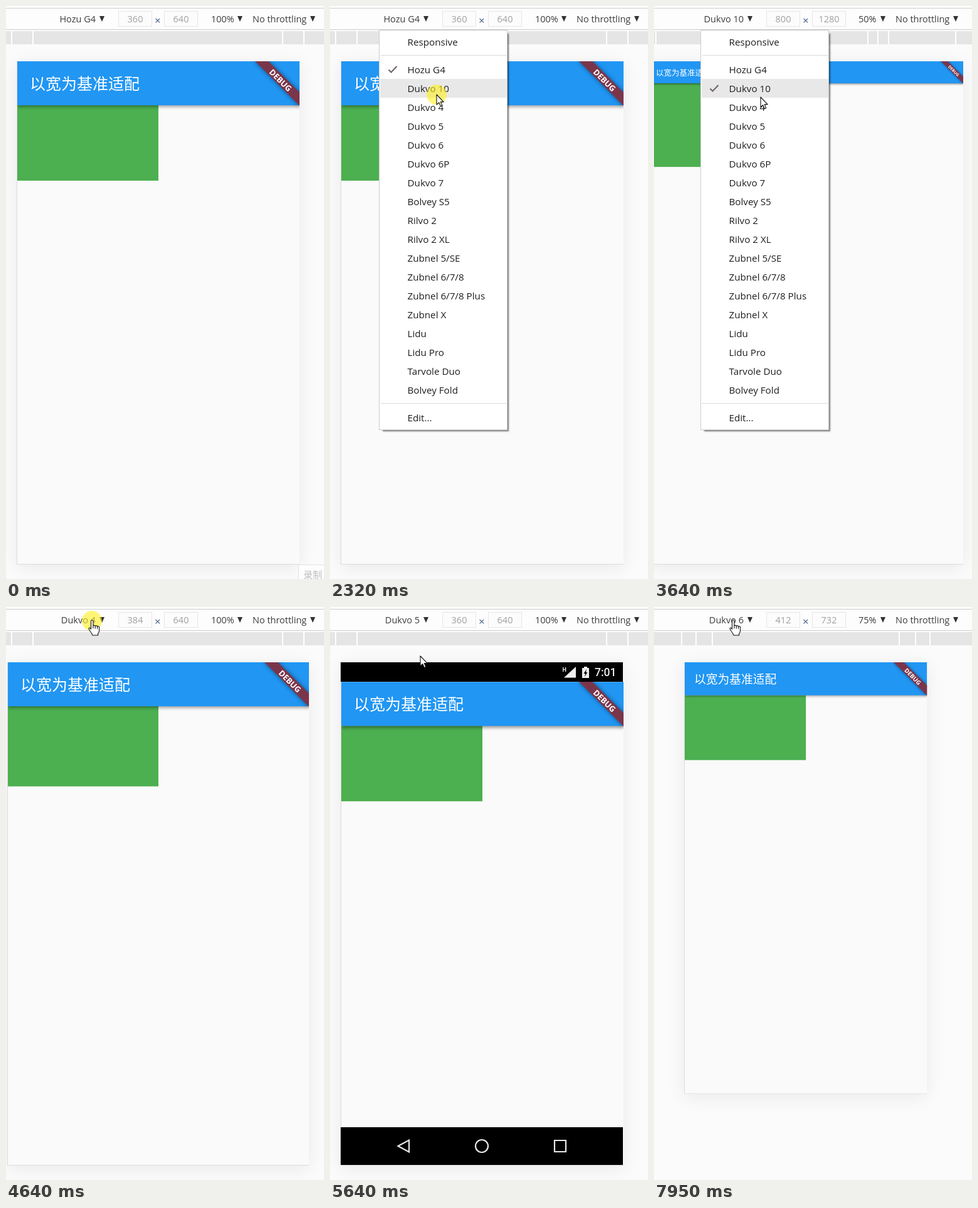
Animation, 507 px wide and 912 px high, one loop 8 s. Source, as an HTML page:

```html
<!DOCTYPE html>
<html lang="zh">
<head>
<meta charset="utf-8">
<title>Width-based layout</title>
<style>
html, body { margin: 0; width: 100%; height: 100%; overflow: hidden; background: #fbfbfb; }
#stage { position: absolute; left: 0; top: 0; width: 507px; height: 912px; overflow: hidden; background: #fbfbfb;
  font: 14.5px/20px "Open Sans", "Noto Sans", sans-serif; color: #3c3c3c; }
#stage div, #stage span, #stage svg { position: absolute; white-space: pre; box-sizing: border-box; }
#bar { left: 0; top: 0; width: 507px; height: 61px; background: #fdfdfd; }
#bar .line { left: 0; width: 507px; height: 1px; background: #ccc; }
#bar .ruler { left: 0; top: 40px; width: 507px; height: 21px; background: #e5e5e5; }
#bar .ruler div { top: 0; width: 2px; height: 21px; background: #fff; }
#bar .tri { top: 16px; border: solid transparent; border-width: 9px 4.7px 0; border-top-color: #333; }
#bar .num { top: 8px; width: 54px; height: 25px; border: 1px solid #e6e6e6; background: #fcfcfc;
  color: #a0a0a0; text-align: center; line-height: 24px; }
.frame { border: solid #ddd; border-width: 0 0 1px 1px; box-shadow: 0 5px 28px rgba(0,0,0,.075); }
.page { overflow: hidden; transform-origin: 0 0; background: #fafafa; }
.green { left: 0; background: #4caf50; }
.app { left: 0; width: 100%; height: 56px; background: #2196f3;
  box-shadow: 0 2px 4px -1px rgba(0,0,0,.25), 0 3px 4px rgba(0,0,0,.16), 0 1px 6px rgba(0,0,0,.12); }
.app span { left: 16px; top: 13px; font: 20px/30px "Noto Sans CJK SC", "Noto Sans CJK", sans-serif; color: #fff; }
.ribbon { width: 80px; height: 12px; transform: rotate(45deg); transform-origin: 40px -28px; background: #7b354a;
  box-shadow: 0 0 6px rgba(0,0,0,.5); color: #fff; font-size: 10.2px; font-weight: 700; line-height: 12px; text-align: center; }
.system { left: 0; top: 0; }
#menu { top: 38px; width: 205px; height: 637px; background: #fff; border: 1px solid #ccc;
  box-shadow: 4px 4px 2px -2px rgba(0,0,0,.5); font-size: 15.2px; color: #1e1e1e; }
#menu .sep { left: 2px; width: 200px; height: 1px; background: #d9d9d9; }
#hover { left: 1px; width: 202px; height: 30px; background: #e8e8e8; }
#rec { left: 466px; top: 889px; width: 60px; height: 40px; background: #fdfdfd; border: 1px solid #e2e2e2;
  font: 15px/20px "Noto Sans CJK SC", "Noto Sans CJK", sans-serif; color: #bdbdbd; padding: 5px 0 0 7px; }
#dot { width: 32px; height: 32px; margin: -16px; border-radius: 50%; background: rgba(255,240,30,.6); }
#cursor { left: 0; top: 0; width: 30px; height: 40px; overflow: visible; }
</style>
</head>
<body>
<div id="stage">
  <div id="device"></div>
  <div id="bar"></div>
  <div id="rec">录制</div>
  <div id="menu"></div>
  <div id="dot"></div>
  <svg id="cursor" fill="#fff" stroke="#111" stroke-width="1.1" stroke-linejoin="round">
    <path id="arrow" d="M0 0V16L3.8 12.6L6.4 18.6L8.8 17.6L6.3 11.6H11.2Z"/>
    <path id="hand" d="M-1.5 .5a1.7 1.7 0 0 1 3.4 0V8.5a1.7 1.5 0 0 1 3.4 .4a1.7 1.5 0 0 1 3.3 .7a1.6 1.6 0 0 1 3 1V15.5q0 3-2 5V23H1q-1-3-3.5-6L-5 12.8q-.3-2.2 1.8-1.6L-1.5 13.2ZM1.9 8.5V12M5.3 9V12.4M8.6 9.8V12.8"/>
  </svg>
</div>
<script>
const LOOP = 8000, TICK = 66.25;
const $ = id => document.getElementById(id);

const names = ['Hozu G4', 'Dukvo 10', 'Dukvo 4', 'Dukvo 5', 'Dukvo 6', 'Dukvo 6P', 'Dukvo 7', 'Bolvey S5',
  'Rilvo 2', 'Rilvo 2 XL', 'Zubnel 5/SE', 'Zubnel 6/7/8', 'Zubnel 6/7/8 Plus', 'Zubnel X', 'Lidu', 'Lidu Pro',
  'Tarvole Duo', 'Bolvey Fold'];

// ticks: distances of the ruler gaps from the centre
const devices = [
  { from: 0, w: 360, h: 640, zoom: 100, menuX: 78, ticks: [199, 233] },
  { from: 39, w: 800, h: 1280, zoom: 50, menuX: 74, ticks: [99, 115, 132, 239] },
  { from: 62, w: 384, h: 640, zoom: 100, menuX: 83, ticks: [199, 233] },
  { from: 81, w: 360, h: 640, zoom: 100, menuX: 83, ticks: [199, 233], system: true },
  { from: 115, w: 412, h: 732, zoom: 75, menuX: 83, ticks: [149, 175, 198] }
];

const menuOpen = [[24, 37], [50, 60], [72, 80], [96, 113]];
const pressed = [[22, 24], [35, 39], [48, 49], [59, 62], [70, 71], [79, 84], [94, 95], [111, 114]];
const path = [
  [10, 305, 228], [20, 126, 22], [26, 126, 22], [30, 170, 141], [40, 170, 141], [47, 132, 24],
  [50, 132, 24], [55, 170, 145], [57, 172, 157], [63, 172, 157], [69, 137, 22], [72, 137, 22],
  [77, 180, 180], [83, 180, 180], [85, 144, 78], [90, 122, 27], [96, 122, 27], [102, 185, 228],
  [105, 185, 228], [107, 185, 231], [113, 185, 231], [119, 126, 22]
];

const at = (x, cy, s, style = '') => `<span style="left:${x}px;top:${cy - 10}px;${style}">${s}</span>`;
const tri = x => `<div class="tri" style="left:${x}px"></div>`;
const num = (x, n) => `<div class="num" style="left:${x}px">${n}</div>`;
const show = (el, on) => { el.style.display = on ? '' : 'none'; };
const within = (list, k) => list.some(([a, b]) => k >= a && k < b);

const systemBars = `<svg class="system" width="507" height="912" fill="none" stroke="#e8e8e8" stroke-width="2.2">
  <path d="M17 88H467V119H17ZM17 828H467V888H17Z" fill="#000" stroke="none"/>
  <path d="M392 95V112.5H373Z" fill="#eee" stroke="none"/>
  <path d="M402 97H405V95H410V97H413V113H402Z" fill="#eee" stroke="none"/>
  <path d="M409 99L404.5 106H407L406 111L410.5 104H408Z" fill="#000" stroke="none"/>
  <g fill="#eee" stroke="none" font-family="Roboto, sans-serif">
    <text x="370.5" y="103" font-size="9" font-weight="700">H</text>
    <text x="422" y="110" font-size="17.5" font-weight="500">7:01</text>
  </g>
  <path d="M108.5 858L126 848.5V867.5Z"/>
  <circle cx="242" cy="858" r="10"/>
  <path d="M358 849H376V867H358Z"/>
</svg>`;

function drawDevice(d) {
  const s = d.zoom / 100 * 1.25, w = d.w * s, h = d.h * s;
  const x = Math.floor(243 - w / 2), pad = d.system ? 24.8 : 0;
  const green = Math.round(w * 120 / 450) / s;
  $('device').innerHTML =
    `<div class="frame" style="left:${x - 1}px;top:88px;width:${w + 1}px;height:${h + 1}px"></div>
     <div class="page" style="left:${x}px;top:88px;width:${d.w}px;height:${d.h}px;transform:scale(${s})">
       <div class="green" style="top:${pad + 56}px;width:50%;height:${green}px"></div>
       <div class="app" style="top:${pad}px"><span>以宽为基准适配</span></div>
       <div class="ribbon" style="left:${d.w - 40}px;top:${pad + 28}px">DEBUG</div>
     </div>` + (d.system ? systemBars : '');
}

function drawBar(d, name) {
  const dx = d.zoom === 100 ? 0 : -8;
  const gaps = d.ticks.flatMap(t => [242 - t, 242 + t]);
  $('bar').innerHTML =
    `<div class="line" style="top:3px"></div><div class="line" style="top:37px"></div>
     <div class="ruler">${gaps.map(g => `<div style="left:${g - 1}px"></div>`).join('')}</div>` +
    `<span style="right:364px;top:10.5px">${name}</span>` + tri(149) +
    num(179, d.w) + at(237, 22.5, '×', 'color:#47638c;font-size:17px') + num(252, d.h) +
    at(dx ? 326 : 327, 20.5, d.zoom + '%') + tri(369 + dx) +
    at(393 + dx, 20.5, 'No throttling') + tri(485 + dx);
}

function drawMenu(d, chosen) {
  const item = (cy, s) => at(44.5, cy, s);
  const y = 62 + chosen * 30;
  $('menu').style.left = d.menuX + 'px';
  $('menu').innerHTML =
    '<div id="hover"></div>' + item(18, 'Responsive') +
    names.map((n, i) => item(62 + 30 * i, n)).join('') + item(616, 'Edit...') +
    '<div class="sep" style="top:39px"></div><div class="sep" style="top:593px"></div>' +
    `<svg style="left:12.5px;top:${y - 8}px" width="18" height="16" fill="none" stroke="#756868" stroke-width="2.2">
       <path d="M1.5 8.5L5.5 12.5L14.5 3"/></svg>`;
}

function cursorAt(k) {
  const i = path.findIndex(p => p[0] >= k);
  if (i < 0) return path[path.length - 1].slice(1);
  if (i === 0) return path[0].slice(1);
  const [a, ax, ay] = path[i - 1], [b, bx, by] = path[i];
  const u = (k - a) / (b - a), e = u * (2 - u);
  return [ax + (bx - ax) * e, ay + (by - ay) * e];
}

let lastTick = -1, lastDevice = -1;

function render(k) {
  const n = devices.filter(d => d.from <= k).length - 1;
  if (n !== lastDevice) {
    lastDevice = n;
    drawDevice(devices[n]);
    drawBar(devices[n], names[n]);
    drawMenu(devices[n], n);
  }
  const [x, y] = cursorAt(k), open = within(menuOpen, k);
  show($('menu'), open);
  const row = Math.floor((y - 86) / 30);
  $('hover').style.top = 47 + row * 30 + 'px';
  show($('hover'), row >= 0);

  const hand = !open && y < 36 && x < 162;
  show($('cursor'), k >= 11);
  show($('hand'), hand);
  show($('arrow'), !hand);
  $('cursor').style.transform = `translate(${Math.round(x)}px, ${Math.round(y)}px)`;

  show($('dot'), within(pressed, k));
  $('dot').style.left = x + 'px';
  $('dot').style.top = y + 'px';

  show($('rec'), k < 2);
  $('rec').style.opacity = k < 1 ? 1 : .5;
}

const start = performance.now();
function frame() {
  const t = (performance.now() - start) % LOOP;
  const k = Math.floor(t / TICK + .3);
  if (k !== lastTick) render(lastTick = k);
  requestAnimationFrame(frame);
}
frame();
</script>
</body>
</html>
```
